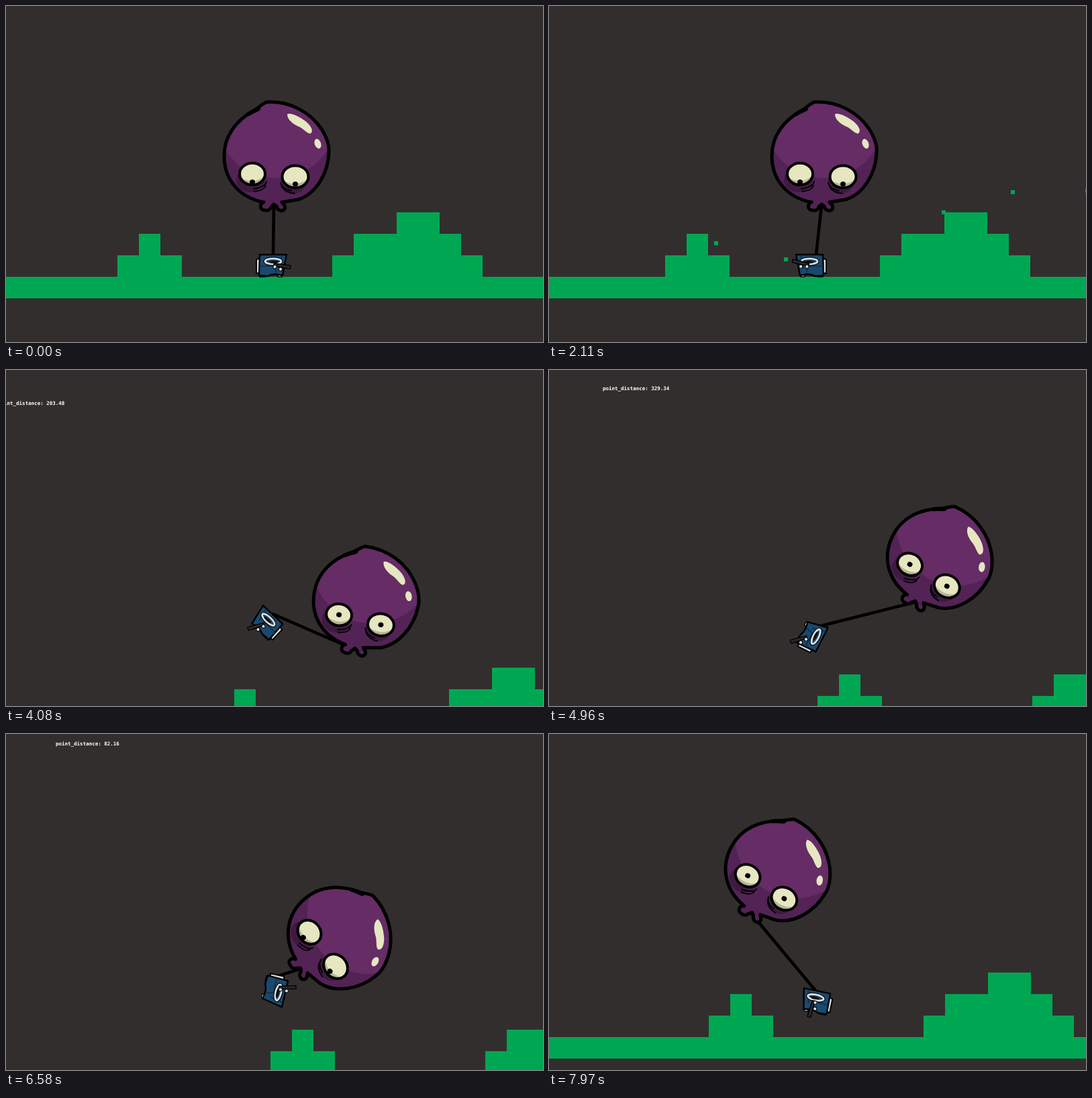
Recreate the animation shown at these times as an HTML page with a canvas. Size 800 px wide and 500 px high, loop 8000 ms.

```html
<!DOCTYPE html>
<html lang="en">
<head>
<meta charset="utf-8">
<title>Balloon</title>
<style>
html, body { margin: 0; width: 100%; height: 100%; overflow: hidden; background: #332e2e; }
canvas { display: block; }
</style>
</head>
<body>
<canvas id="stage" width="800" height="500"></canvas>
<script>
const ctx = document.getElementById('stage').getContext('2d');
const LOOP = 8000, TAU = Math.PI * 2, RAD = Math.PI / 180;
const BG = '#332e2e', GREEN = '#00a752', CREAM = '#e6e7c1', WHITE = '#dedede';
const PURPLE = '#652c66', SHADE = '#522354', BAG = '#3e1a41';

// Moments of the story, in ms.
const WALK = 2797, JUMP = 3105, LAND = 5650, JUMP_BACK = 5895, LAND_BACK = 8230;
const SWING = 4960, TUG = 6580, END = 7970;
const GRAVITY = 8.9e-5, BULLET_SPEED = 0.74, SHOT_GAP = 144;

const clamp = (v, low, high) => Math.min(high, Math.max(low, v));
const span = (t, from, to) => clamp(t, from, to) - from;
const ramp = (t, from, to) => {
  const u = span(t, from, to) / (to - from);
  return u * u * (3 - 2 * u);
};

// Height and upward speed of the hero's leaps.
function leap(t) {
  const [from, to] = t < JUMP_BACK ? [JUMP, LAND] : [JUMP_BACK, LAND_BACK];
  if (t <= from || t >= to) return { height: 0, speed: 0 };
  return { height: GRAVITY * (t - from) * (to - t), speed: GRAVITY * (from + to - 2 * t) };
}

function pose(t) {
  const { height, speed } = leap(t);
  const lag = Math.tanh(speed * 20);  // the camera trails the hero
  return {
    camX: Math.round(7 * ramp(t, 300, 1700) + 0.105 * span(t, WALK, LAND - 5) - 0.1122 * span(t, 5885, LOOP)),
    camY: Math.round(height),
    heroX: 393 - 3 * ramp(t, WALK, 4500) + 11 * ramp(t, 5300, 5800),
    heroY: 386 - 10.5 * lag + 2.5 * lag * lag,
    heroTurn: -12 * ramp(t, JUMP, 3360) + 129 * ramp(t, 3360, SWING) - 77 * ramp(t, SWING, LAND)
      + 63 * ramp(t, JUMP_BACK, TUG) - 91 * ramp(t, TUG, END),
    aim: 10 - 32 * ramp(t, 900, 1868) - 145 * ramp(t, 1868, 1953) - 31 * ramp(t, JUMP, 3500)
      + 186 * ramp(t, 5300, 5600) + 12 * ramp(t, 5840, TUG) + 105 * ramp(t, TUG, END),
    ballX: 403 - 132 * ramp(t, 3618, 6718),
    ballY: 218 - 55 * ramp(t, 3618, SWING) + 37 * ramp(t, SWING, 6300) - 48 * ramp(t, TUG, END),
    ballTurn: 49 * ramp(t, 3040, 6645) - 20.4 * ramp(t, 6645, END),
    look: 12 - 12 * ramp(t, 2900, 3200) + 12 * ramp(t, 5200, 5600) - 12 * ramp(t, 6700, 7200),
    distance: 110 + 219.34 * ramp(t, 3360, SWING) - 247.18 * ramp(t, SWING, TUG) + 224 * ramp(t, TUG, END)
  };
}

const shots = [];
for (let t = 284; t <= 1868; t += SHOT_GAP) shots.push(t);
for (let t = 1953; t <= JUMP; t += SHOT_GAP) shots.push(t);

function paint(shape, fill, stroke, width) {
  if (fill) { ctx.fillStyle = fill; ctx.fill(shape); }
  if (stroke) { ctx.strokeStyle = stroke; ctx.lineWidth = width; ctx.stroke(shape); }
}
function oval(x, y, rx, ry, turn = 0) {
  const p = new Path2D();
  p.ellipse(x, y, rx, ry, turn, 0, TAU);
  return p;
}
function scoped(draw) { ctx.save(); draw(); ctx.restore(); }

const skin = new Path2D(`M-15 -75 C20 -77 50 -60 67 -35 C75 -22 79 -10 78 0 C77 32 58 62 32 70
  L8 74 C9 76 15 79 12 84 C9 89 1 86 0 80 L-4 77 L-8 81 C-9 85 -13 87 -17 86
  C-25 86 -26 77 -19 74 C-56 67 -78 40 -78 5 C-78 -25 -60 -48 -33 -63 C-27 -66 -22 -72 -15 -75Z`);
const crease = new Path2D('M-42 -57 C-35 -62 -31 -62 -27 -65');
const shine = new Path2D('M16 -57 C20 -60 34 -54 44 -46 C52 -39 56 -31 50 -28 C44 -29 40 -36 32 -39 C24 -43 16 -49 16 -57Z');
const wrinkles = new Path2D(`M-15 43 Q-17 52 -34 54 M-16 49 Q-19 57 -33 58
  M6 45 Q8 54 22 57 M8 51 Q13 60 27 61`);
const pack = new Path2D('M-20 -9 L-15 -10 L-15 11 L-20 12Z');
const box = new Path2D('M-15 -16 L25 -16 L19 15 Q5 11 -3 16 L-16 15Z');
const seams = new Path2D('M-15 1 L7 1 L10 12 M18 -15 L14 4');
const feet = new Path2D('M-15 14 L-6 14 L-7 17 L-15 17Z M13 14 L19 14 L18 17 L12 17Z');
const gun = new Path2D('M-1 -2 L24 -3 L24 2 L9 2 L-1 2Z');

function terrain(x, y) {
  ctx.fillStyle = GREEN;
  const block = (left, right, top) => ctx.fillRect(left + x, top + y, right - left, 435 - top);
  block(-154, 1300, 403);
  block(166, 262, 371);
  block(198, 230, 339);
  block(486, 710, 371);
  block(518, 678, 339);
  block(582, 646, 307);
}

function eye(x, y, size, look) {
  const ball = oval(x, y, size, size * 0.85);
  paint(ball, '#b6b698');
  scoped(() => {
    ctx.clip(ball);
    paint(oval(x - 1, y - 6, size + 3, size * 0.85), CREAM);
  });
  paint(ball, null, '#000', 4);
  paint(oval(x, y + look, 4, 3.7), '#000');
}

function balloon(x, y, turn, look) {
  scoped(() => {
    ctx.translate(x, y);
    ctx.rotate(turn * RAD);
    paint(skin, SHADE);
    scoped(() => {
      ctx.clip(skin);
      paint(oval(0, -49, 89, 87), PURPLE);
      paint(oval(-39, 41, 21, 18), BAG);
      paint(oval(25, 44, 19, 17), BAG);
    });
    paint(skin, null, '#000', 5);
    paint(crease, null, '#000', 6);
    paint(shine, CREAM);
    paint(oval(61.5, -13, 4.7, 7.5, -0.35), CREAM);
    paint(wrinkles, null, '#000', 1.8);
    eye(-36, 32, 19, look);
    eye(28, 36, 19.5, look * 0.92);
  });
}

function hero(x, y, turn, aim) {
  const side = Math.cos(aim * RAD) < 0 ? -1 : 1;
  scoped(() => {
    ctx.translate(x, y);
    ctx.rotate(turn * RAD);
    ctx.scale(side, 1);
    paint(pack, WHITE, '#000', 2);
    paint(feet, WHITE, '#000', 1.3);
    paint(box, '#1a496f', '#000', 2.4);
    paint(seams, null, '#0d2c45', 1.5);
    const ring = oval(5, -6, 12, 4.2);
    paint(ring, null, '#000', 5);
    paint(ring, '#173f5f', WHITE, 2.8);
    paint(oval(6, -5, 7, 2), '#111');
  });
  scoped(() => {
    ctx.translate(x + 7 * side, y - 1);
    ctx.rotate(aim * RAD);
    ctx.scale(1, side);
    paint(gun, '#2b2928', '#000', 1.4);
    for (const [hx, hy] of [[1, 3], [10, 5]]) paint(oval(hx, hy, 2.6, 2.6), WHITE, '#000', 1);
  });
}

function bullets(t, camX, camY) {
  ctx.fillStyle = GREEN;
  for (const born of shots) {
    const age = t - born;
    if (age < 0 || age > 800) continue;
    const from = pose(born), angle = from.aim * RAD, reach = 31 + age * BULLET_SPEED;
    const x = from.heroX - from.camX + Math.cos(angle) * reach + camX;
    const y = from.heroY - from.camY + Math.sin(angle) * reach + camY;
    ctx.fillRect(Math.round(x - 3), Math.round(y - 3), 6, 6);
  }
}

function shake(t) {
  const age = t - shots.filter(born => born <= t).pop();
  return age < SHOT_GAP ? Math.round(3 * Math.sin((age - 13) / SHOT_GAP * TAU)) : 0;
}

function draw(t) {
  const p = pose(t);
  const ballX = p.ballX + p.camX, ballY = p.ballY + p.camY;

  ctx.fillStyle = BG;
  ctx.fillRect(0, 0, 800, 500);
  if (t < 3500) {
    ctx.fillStyle = '#1d1a1a';
    ctx.fillRect(612, 90, 1, 1);
  }
  scoped(() => {
    ctx.translate(0, shake(t));
    terrain(p.camX, p.camY);
    bullets(t, p.camX, p.camY);

    const cos = Math.cos(p.ballTurn * RAD), sin = Math.sin(p.ballTurn * RAD);
    const string = new Path2D();
    string.moveTo(ballX - 4 * cos - 79 * sin, ballY - 4 * sin + 79 * cos);
    string.lineTo(398, p.heroY - 16);
    paint(string, null, '#000', 4.6);
    balloon(ballX, ballY, p.ballTurn, p.look);
    hero(p.heroX, p.heroY, p.heroTurn, p.aim);

    ctx.fillStyle = '#fff';
    ctx.font = 'bold 7.5px "DejaVu Sans Mono", monospace';
    ctx.fillText('point_distance: ' + p.distance.toFixed(2), p.camX - 154, p.camY - 84.5);
  });
}

ctx.lineJoin = ctx.lineCap = 'round';
const begin = performance.now();
function tick() {
  draw((performance.now() - begin) % LOOP);
  requestAnimationFrame(tick);
}
tick();
</script>
</body>
</html>
```
